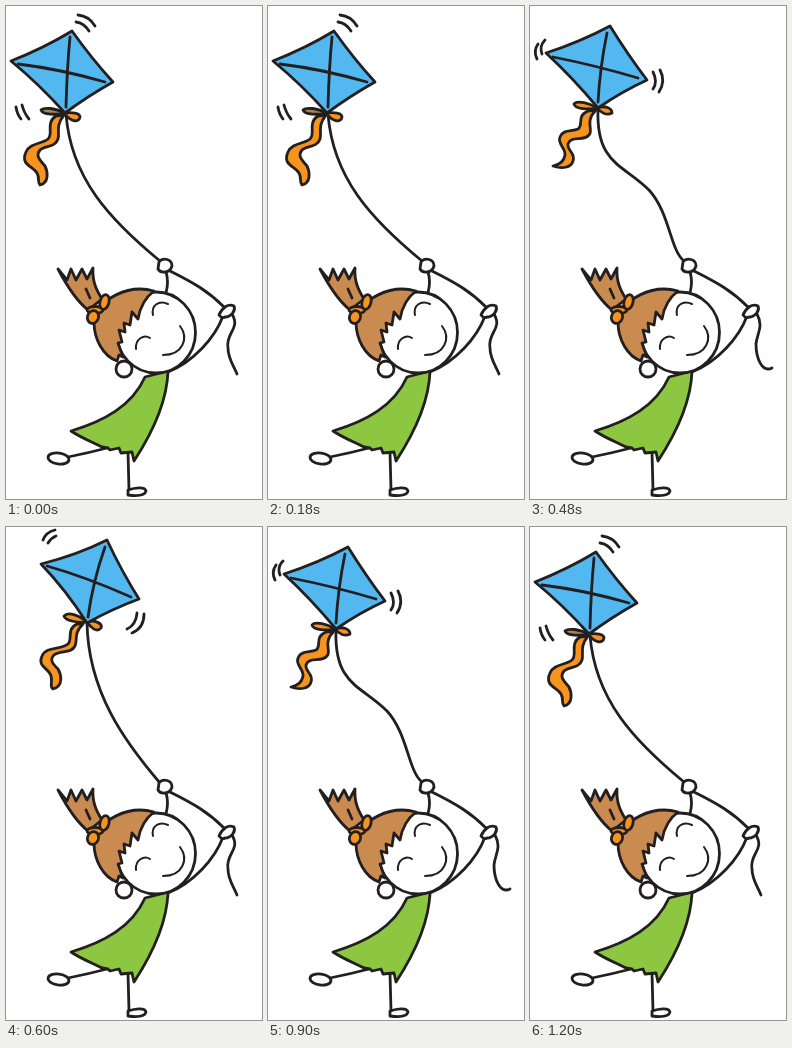
Write an HTML page that moves like this. It is 256 px wide and 493 px high and loops after 1.3 s.

```html
<!DOCTYPE html>
<html lang="en">
<head>
<meta charset="utf-8">
<title>Girl flying a kite</title>
<style>
  html, body { margin: 0; width: 100%; height: 100%; overflow: hidden; background: #fff; }
  svg { display: block; width: 256px; height: 493px; }
  path, ellipse { fill: none; stroke: #231f20; stroke-width: 2.8; stroke-linecap: round; stroke-linejoin: round; }
  .blue { fill: #52b8ef; }
  .orange { fill: #f7941e; }
  .brown { fill: #ca8b50; }
  .dull { fill: #a58757; }
  .green { fill: #8dc641; }
  .white { fill: #fff; }
  .thin { stroke-width: 2; }
  .pose { visibility: hidden; }
</style>
</head>
<body>
<svg viewBox="0 0 256 493">
  <!-- kite leaning left -->
  <g class="pose">
    <path d="M60 108C65 172 103 213 154 255"/>
    <path d="M226 308C235 323 219 327 222 342C222 353 228 360 231 368"/>
    <path class="orange" d="M50 110C39 117 48 128 42 133C36 138 24 137 20 146C14 159 27 160 31 167C34 172 31 176 34 179C43 177 42 166 39 160C34 154 29 150 34 144C39 139 49 142 52 133C54 127 49 120 58 109Z"/>
    <path class="dull" d="M58 107C50 109 37 109 35 104C38 101 50 102 58 107Z"/>
    <path class="orange" d="M59 107C66 106 74 107 74 111C73 117 65 116 59 108Z"/>
    <path class="blue" d="M66 25Q86 53 107 76Q82 90 59 107Q33 78 5 55Q38 42 66 25Z"/>
    <path d="M64 31Q61 62 60 101M12 58Q54 63 99 76"/>
    <path d="M72 9Q83 10 89 20M70 16Q78 17 83 25M10 101Q11 108 15 113M16 99Q18 107 23 113"/>
  </g>
  <!-- kite upright -->
  <g class="pose">
    <path d="M68 103C66 158 93 158 119 184C140 207 140 244 154 255"/>
    <path d="M227 308C234 321 227 327 226 338C226 352 232 367 242 362"/>
    <path class="orange" d="M58 105C46 110 54 119 48 123C42 126 33 123 30 131C27 138 36 142 35 149C34 156 28 159 23 160C32 163 41 162 43 155C46 147 37 145 38 138C41 129 53 136 59 129C64 124 54 116 66 104Z"/>
    <path class="orange" d="M67 102C59 104 45 103 44 98C47 94 60 97 67 102Z"/>
    <path class="orange" d="M67 102C75 99 82 102 82 107C77 110 71 107 67 102Z"/>
    <path class="blue" d="M80 20Q98 49 117 74Q91 86 68 102Q43 72 16 47Q50 36 80 20Z"/>
    <path d="M77 27Q70 61 68 96M23 51Q64 59 108 72"/>
    <path d="M15 34Q9 40 12 48M8 38Q3 45 7 53M123 66Q128 76 123 83M130 64Q136 75 129 86"/>
  </g>
  <!-- kite leaning right -->
  <g class="pose">
    <path d="M81 95C82 165 119 215 154 256"/>
    <path d="M226 308C235 323 219 327 222 342C222 353 228 360 231 368"/>
    <path class="orange" d="M71 97C60 102 67 112 62 117C55 123 40 119 36 129C31 140 43 141 45 149C47 155 43 159 47 162C58 159 55 147 52 142C47 137 43 133 48 128C54 123 65 127 69 119C72 112 67 107 77 97Z"/>
    <path class="orange" d="M80 95C73 96 59 94 58 89C62 84 75 89 80 95Z"/>
    <path class="orange" d="M81 95C89 92 97 97 95 101C91 106 85 101 81 95Z"/>
    <path class="blue" d="M101 13Q116 45 133 72Q106 82 81 96Q60 63 35 37Q71 28 101 13Z"/>
    <path d="M99 20Q87 54 82 90M41 39Q80 50 125 70"/>
    <path d="M37 13Q40 5 49 3M42 16Q45 11 50 9M131 86Q130 98 121 102M138 87Q138 101 126 106"/>
  </g>

  <!-- legs and dress -->
  <path d="M101 442Q82 447 62 451M122 446L123 484"/>
  <ellipse class="white" cx="52.5" cy="452.5" rx="10.5" ry="5.5" transform="rotate(8 52.5 452.5)"/>
  <path class="white" d="M122 484C128 482 139 480 140 485C139 490 130 490 122 489Z"/>
  <path class="green" d="M139 371C126 400 98 415 65 425C77 433 89 437 96 441L102 442 104 444 113 442 115 447 126 446 128 455C145 429 161 398 162 365Z"/>

  <!-- arms and taut string -->
  <path d="M160 266Q163 275 160 287M164 265C188 277 202 285 218 301M217 310C209 332 187 356 162 366"/>
  <path class="white" d="M153 256C157 251 166 253 166 260C164 267 155 268 152 263Z"/>
  <path class="white" d="M213 309C216 302 222 297 228 300C230 305 225 311 219 311Q216 313 213 309Z"/>

  <!-- head -->
  <ellipse class="white" cx="118" cy="363" rx="8" ry="8"/>
  <ellipse class="white" cx="150" cy="326.5" rx="39.5" ry="40.5"/>
  <path class="brown" d="M148 285C123 278 92 292 88 316C88 333 97 350 111 355L113 349 117 351 112 337 116 336 113 324 119 326 118 317 124 319 126 306 132 313C134 301 140 291 148 285Z"/>
  <path class="thin" d="M130 343C129 333 138 328 144 332M147 309C145 299 153 294 162 298M174 320C183 332 177 349 157 349"/>

  <!-- ponytail and bow -->
  <path class="brown" d="M52 263L61 274 65 263 70 274 76 263 81 273 87 262C86 276 91 285 96 293L82 304C72 296 63 284 52 263Z"/>
  <path d="M80 283L84 292"/>
  <ellipse class="orange" cx="89" cy="304" rx="8" ry="3.5"/>
  <ellipse class="orange" cx="87" cy="311" rx="5.5" ry="6.5" transform="rotate(20 87 311)"/>
  <ellipse class="orange" cx="98.5" cy="296" rx="4.5" ry="7.5" transform="rotate(15 98.5 296)"/>
</svg>
<script>
  const poses = document.querySelectorAll('.pose');
  const order = [0, 1, 2, 1, 0];
  const start = performance.now();

  function draw() {
    const time = (performance.now() - start) % 1300;
    const current = order[Math.floor(time / 300)];
    poses.forEach((pose, i) => {
      pose.style.visibility = i === current ? 'visible' : 'hidden';
    });
    requestAnimationFrame(draw);
  }
  draw();
</script>
</body>
</html>
```
